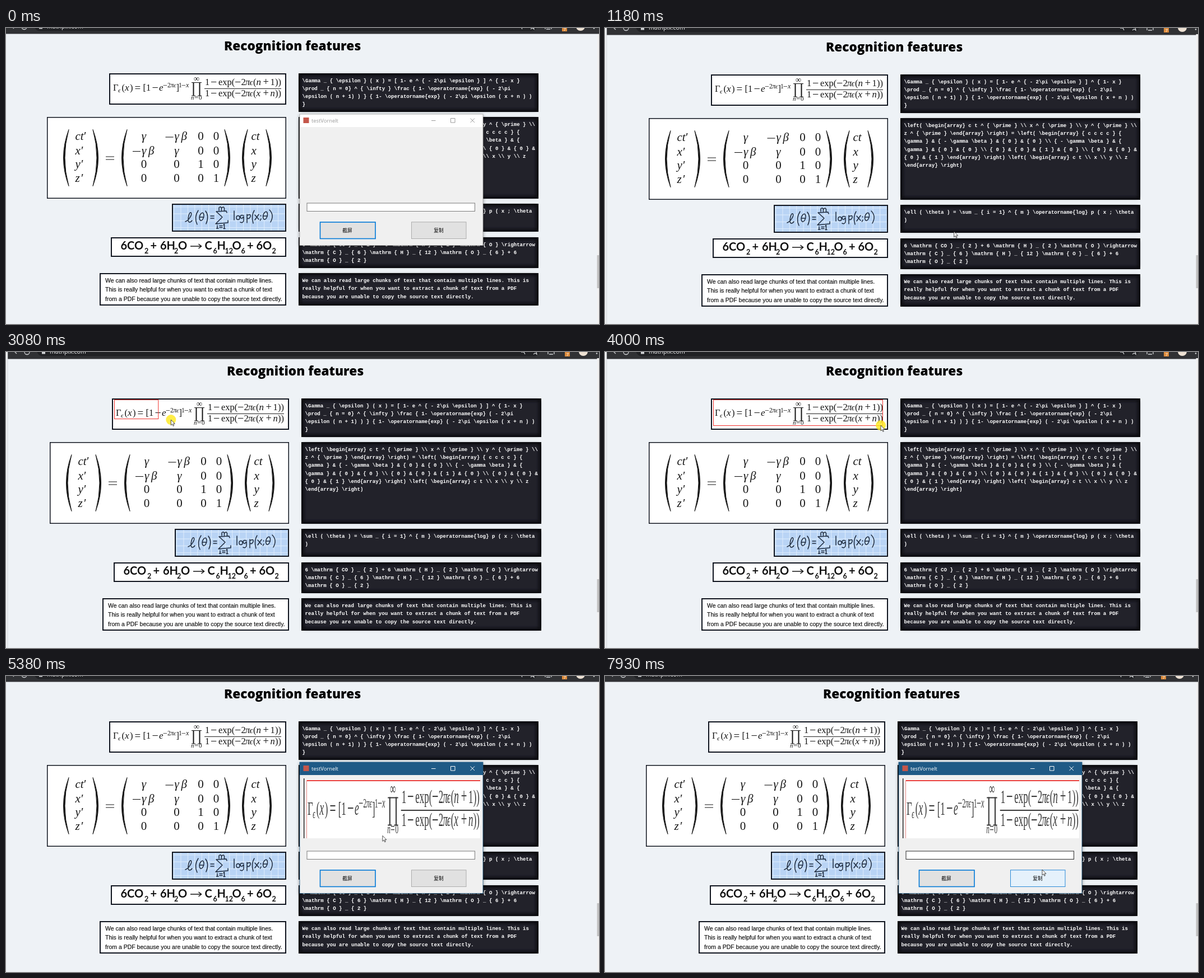
An HTML page for the animation above (8000 ms loop, 1058 by 529 pixels).

```html
<!DOCTYPE html>
<html lang="en">
<head>
<meta charset="utf-8">
<title>Recognition features</title>
<style>
html, body { margin: 0; width: 100%; height: 100%; overflow: hidden; background: #eef2f6; }
svg { display: block; width: 100vw; height: 100vh; }
.code { font: bold 9.12px "Liberation Mono", monospace; fill: #fff; }
.sans { font: 10.5px "Liberation Sans", sans-serif; fill: #0c0c0c; stroke: #0c0c0c; stroke-width: .15px; }
.head { font: 800 22.6px "Open Sans", sans-serif; fill: #000; }
.chem { font: 700 20px Lato, sans-serif; fill: #111; }
.ui { font: 9.4px "Open Sans", sans-serif; }
.cjk { font: 8.7px "Noto Sans CJK SC", "Noto Sans CJK", sans-serif; fill: #000; text-anchor: middle; }
.math { font-family: "Liberation Serif", "DejaVu Serif", serif; fill: #151515; }
.it { font-style: italic; }
.mid { text-anchor: middle; }
.line { fill: none; stroke: #151515; }
</style>
</head>
<body>
<svg id="stage" viewBox="0 0 1058 529" preserveAspectRatio="none">
  <defs>
    <filter id="blur" x="-10%" y="-30%" width="120%" height="160%"><feGaussianBlur stdDeviation="3"/></filter>
    <pattern id="grid" width="12.4" height="12.4" x="299" y="319" patternUnits="userSpaceOnUse">
      <path d="M0 .5H12.4M.5 0V12.4" stroke="#dcebfc" stroke-width="1.2"/>
    </pattern>
    <clipPath id="shotClip"><rect x="531" y="183" width="315" height="107"/></clipPath>
  </defs>
</svg>
<script>
const NS = "http://www.w3.org/2000/svg";
const LOOP = 8000;
const stage = document.getElementById("stage");

function add(parent, tag, attrs = {}, text) {
  const node = document.createElementNS(NS, tag);
  set(node, attrs);
  if (text !== undefined) node.textContent = text;
  parent.appendChild(node);
  return node;
}
function set(node, attrs) {
  for (const k in attrs) node.setAttribute(k, attrs[k]);
}
const rect = (p, x, y, width, height, fill, more = {}) => add(p, "rect", { x, y, width, height, fill, ...more });
const path = (p, d, more = {}) => add(p, "path", { d, class: "line", ...more });
const label = (p, x, y, cls, text, more = {}) => add(p, "text", { x, y, class: cls, ...more }, text);
const show = (node, on) => node.setAttribute("visibility", on ? "visible" : "hidden");

const page = add(stage, "g");
rect(page, -10, -10, 1080, 550, "#eef2f6");

// browser bar
function drawBar() {
  const g = add(page, "g", { stroke: "#d0d2d5", fill: "none", "stroke-width": 1.3 });
  rect(g, -10, -10, 1080, 20.5, "#303134", { stroke: "none" });
  rect(g, 50, -20, 898, 25.5, "#202124", { rx: 11, stroke: "none" });
  add(g, "path", { d: "M14 1L10 -3M28 -2A4.5 4.5 0 0 0 37 -2" });
  rect(g, 59, -4, 6, 5.5, "#d0d2d5", { stroke: "none" });
  label(g, 73, 1, "ui", "mathpix.com", { style: "font-size:10.6px", fill: "#f1f3f4", stroke: "none" });
  add(g, "path", { d: "M914 -2H919L921 2M936 2L939 0L942 2L941 -3" });
  add(g, "path", { d: "M962 2V-2M964 2H971M973 2V-2" });
  rect(g, 992, -4, 9, 10, "#dc8b3c", { stroke: "none" });
  label(g, 994.5, 5, "ui", "7", { style: "font-size:8px", fill: "#fff", stroke: "none" });
  add(g, "circle", { cx: 1025, cy: -3, r: 8, fill: "#eee2d4", stroke: "none" });
  add(g, "circle", { cx: 1049, cy: .5, r: 1.3, fill: "#d0d2d5", stroke: "none" });
}
drawBar();
label(page, 389, 40, "head", "Recognition features");

// dark panels with LaTeX
const panels = [
  [81, 69, 96.5, String.raw`\Gamma _ { \epsilon } ( x ) = [ 1- e ^ { - 2\pi \epsilon } ] ^ { 1- x }
\prod _ { n = 0} ^ { \infty } \frac { 1- \operatorname{exp} ( - 2\pi
\epsilon ( n + 1) ) } { 1- \operatorname{exp} ( - 2\pi \epsilon ( x + n ) )
}`],
  [159, 146, 174.8, String.raw`\left( \begin{array} c t ^ { \prime } \\ x ^ { \prime } \\ y ^ { \prime } \\
z ^ { \prime } \end{array} \right) = \left( \begin{array} { c c c c } {
\gamma } & { - \gamma \beta } & { 0 } & { 0 } \\ { - \gamma \beta } & {
\gamma } & { 0 } & { 0 } \\ { 0 } & { 0 } & { 1 } & { 0 } \\ { 0 } & { 0 } &
{ 0 } & { 1 } \end{array} \right) \left( \begin{array} c t \\ x \\ y \\ z
\end{array} \right)`],
  [314, 50, 330, String.raw`\ell ( \theta ) = \sum _ { i = 1} ^ { m } \operatorname{log} p ( x ; \theta
)`],
  [374, 55, 389.5, String.raw`6 \mathrm { CO } _ { 2 } + 6 \mathrm { H } _ { 2 } \mathrm { O } \rightarrow
\mathrm { C } _ { 6 } \mathrm { H } _ { 12 } \mathrm { O } _ { 6 } + 6
\mathrm { O } _ { 2 }`],
  [438, 58, 454, `We can also read large chunks of text that contain multiple lines. This is
really helpful for when you want to extract a chunk of text from a PDF
because you are unable to copy the source text directly.`]
];
for (const [y, h, base, text] of panels) {
  rect(page, 522, y, 428, h, "#08080c");
  rect(page, 526, y + 4, 420, h - 8, "#20202b", { filter: "url(#blur)" });
  rect(page, 522.5, y + .5, 427, h - 1, "none", { stroke: "#08080c" });
  text.split("\n").forEach((s, i) => label(page, 528.5, base + i * 14.3, "code", s));
}

// framed images
const frames = [[184, 81, 56, 2], [73, 159, 146, 1.5], [296, 314, 50, 2], [187, 374, 35, 2], [167, 438, 58, 2]];
for (const [x, y, h, w] of frames)
  rect(page, x + w / 2, y + w / 2, 500 - x - w, h - w, y === 314 ? "#b9d4f5" : "#fff", { stroke: "#10151f", "stroke-width": w });

const math = (p, x, y, size, text, cls = "") =>
  label(p, x, y, "math " + cls, text, { "font-size": size });

function drawGamma() {
  const g = add(page, "g", { id: "gamma" });
  const put = (x, y, size, text, cls) => math(g, x, y, size, text, cls);
  put(191, 112, 16.5, "Γ");
  put(200, 115, 11, "ϵ", "it");
  put(206.5, 112, 16.5, "(");
  put(212, 112, 17, "x", "it");
  put(221, 112, 16.5, ")");
  put(229.5, 113, 19, "=");
  put(244.5, 112, 16.5, "[1");
  put(260.5, 113, 20, "−");
  put(273, 112, 17, "e", "it");
  put(280, 107, 14, "−");
  put(288, 106, 11.5, "2");
  put(293.5, 106, 11.5, "π", "it");
  put(299, 106, 11, "ϵ", "it");
  put(303.5, 112, 16.5, "]");
  put(308, 106, 11.5, "1");
  put(313, 107, 14, "−");
  put(321, 106, 12, "x", "it");
  put(340, 94.5, 14, "∞", "mid");
  put(330, 128, 11, "n", "it");
  put(336, 128, 13, "=");
  put(344, 128, 11, "0");
  path(g, "M331 97.5H349M331 121H338M342 121H349", { "stroke-width": 1 });
  path(g, "M334.5 97V121M345.5 97V121", { "stroke-width": 2 });
  path(g, "M354 108.3H491", { "stroke-width": 1 });
  for (const [y, a, b] of [[102, "n", "1"], [122, "x", "n"]]) {
    put(355, y, 16.5, "1");
    put(365, y + 1, 20, "−");
    put(379, y, 16.5, "exp(");
    put(408, y + 1, 20, "−");
    put(419.5, y, 16.5, "2");
    put(427, y, 16.5, "π", "it");
    put(434.5, y, 15, "ϵ", "it");
    put(441, y, 16.5, "(");
    put(446.5, y, 17, a, "it");
    put(458.5, y, 18.5, "+");
    put(471.5, y, 16.5, b, b === "n" ? "it" : "");
    put(480, y, 16.5, "))");
  }
}
drawGamma();

function drawMatrix() {
  const rows = [200, 225.5, 250, 275];
  const size = 21;
  const cell = (x, y, s) => {
    if (s === "−γβ") {
      path(page, `M${x - 20} ${y - 5}h14`, { "stroke-width": 1.1 });
      math(page, x - 4, y, size, "γ", "it");
      math(page, x + 8, y, size, "β", "it");
    } else math(page, x, y, size, s, s === "γ" ? "it mid" : "mid");
  };
  const grid = ["γ −γβ 0 0", "−γβ γ 0 0", "0 0 1 0", "0 0 0 1"];
  const cols = [246, 304.5, 347.5, 375];
  rows.forEach((y, i) => {
    const name = ["ct", "x", "y", "z"][i];
    math(page, 123.5, y, size, name, "it");
    math(page, i ? 134 : 139, y, size, "′");
    math(page, 437.5, y, size, name, "it");
    grid[i].split(" ").forEach((s, j) => cell(cols[j], y, s));
  });
  for (const x of [112, 216, 431])
    path(page, `M${x} 181.5Q${x - 19} 232 ${x} 282.5Q${x - 14} 232 ${x} 181.5Z`, { style: "fill:#151515" });
  for (const x of [155, 390, 464])
    path(page, `M${x} 181.5Q${x + 19} 232 ${x} 282.5Q${x + 14} 232 ${x} 181.5Z`, { style: "fill:#151515" });
  path(page, "M178 230H193M178 235H193", { "stroke-width": 1.1 });
}
drawMatrix();

function drawNote() {
  rect(page, 298, 316, 200, 46, "url(#grid)");
  const ink = { style: "stroke:#1d2a3d;stroke-width:1.5;stroke-linecap:round;stroke-linejoin:round" };
  const theta = "M346 343C343 336 349 328 352 331C355 336 350 348 346 343ZM346 338H353";
  path(page, "M320 346C326 344 333 333 330 330C326 328 323 346 327 347Q330 347 332 344M343 326Q335 338 341 351M356 327Q363 336 357 350M365 336H371M365 340H371", ink);
  path(page, theta, ink);
  path(page, theta, { ...ink, transform: "translate(113.5 -2)" });
  path(page, "M394 330L393 327L375 328L386 338L374 350L396 348V344M380 326V321Q383 318 384.5 322V326M384.5 322Q388 318 389.5 322V326", ink);
  path(page, "M377 353V358M375.5 358H379M377 350V350.3M381 353.5H386M381 356.5H386M388 352L389.5 350.5V358.5M388 358.5H391", ink);
  path(page, "M407 327V343M411 339a3 3.5 0 1 0 6 0a3 3.5 0 1 0 -6 0M424 335Q418 333 418 338Q420 343 424 337V345Q422 349 418 347", ink);
  path(page, "M430 333V348M430 335Q437 331 436 337Q434 342 430 340M443 326Q437 335 441 349M444 334L451 342M451 333L444 343M454.5 335V336M455 341L453.5 344M470 325Q479 334 472 347", ink);
}
drawNote();

function drawReaction() {
  const big = [[204.5, "6CO"], [257.5, "+"], [275, "6H"], [307, "O"], [354.5, "C"], [376.5, "H"], [403.5, "O"], [430, "+"], [446.5, "6O"]];
  const sub = [[247, "2"], [300, "2"], [369.5, "6"], [390.5, "12"], [419.5, "6"], [474.5, "2"]];
  for (const [x, s] of big) label(page, x, 396, "chem", s);
  for (const [x, s] of sub) label(page, x, 403, "chem", s, { style: "font-size:12.5px" });
  path(page, "M329 390H348M343.5 386L348.5 390L343.5 394", { "stroke-width": 1.6 });
}
drawReaction();

["We can also read large chunks of text that contain multiple lines.",
 "This is really helpful for when you want to extract a chunk of text",
 "from a PDF because you are unable to copy the source text directly."
].forEach((s, i) => label(page, 177, 455 + i * 16.4, "sans", s));

// edge of the capture overlay and the scrollbar
const edge = add(stage, "g");
rect(edge, 0, 0, 3, 529, "#f3f5f7");
rect(edge, 2.5, 0, .8, 529, "#c5cad0");
rect(stage, 1054.5, 11, 4, 518, "#f1f1f1");
rect(stage, 1054.5, 406, 4, 59, "#c1c1c1");

// app window
const win = add(stage, "g");
rect(win, 524, 156, 327, 233, "#000", { opacity: .45, filter: "url(#blur)" });
rect(win, 524, 154, 327, 234.5, "#f0f0f0");
const titleBar = rect(win, 524, 154, 327, 23, "#fff");
rect(win, 530.5, 160, 10, 10, "#c4564a");
const title = label(win, 545, 169, "ui", "testVornelt");
const controls = add(win, "path", { d: "M759 165.5H766.5M793.5 161.5H801V169H793.5ZM828.5 161.5L836 169M836 161.5L828.5 169", fill: "none" });
const outline = rect(win, 524, 154, 327, 234.5, "none");
const field = rect(win, 537, 313, 299.5, 14.5, "#fff");
const snap = rect(win, 560.5, 347, 98.5, 29.5, "#e1e1e1");
const copy = rect(win, 723.5, 346.8, 97.5, 29.7, "#e1e1e1");
label(win, 609, 365, "cjk", "截屏");
label(win, 772, 365, "cjk", "复制");

const shot = add(win, "g", { "clip-path": "url(#shotClip)" });
rect(shot, 531, 185, 315, 105, "#fff");
add(shot, "use", { href: "#gamma", opacity: .85, transform: "translate(538 240) scale(1.023 2.08) translate(-191 -108.3)" });
rect(shot, 531, 183, 1.4, 107, "#151515");
rect(shot, 536, 186, 310, 2, "#e8403c");
rect(shot, 536, 186, 1, 104, "#e58a86");

// selection and pointer
const marquee = add(stage, "rect", { fill: "none", stroke: "#f0302c", "stroke-width": 1 });
const halo = add(stage, "circle", { r: 9, fill: "#ffe81a", opacity: .8 });
const pointer = add(stage, "path", {
  d: "M0 0V10L2.3 7.8L3.9 11.4L5.4 10.7L3.9 7.3H7Z", fill: "#fff", stroke: "#222", "stroke-width": .8
});

// pointer track: time, x, y
const track = [
  [270, 954, 514], [520, 850, 450], [760, 690, 390], [900, 625, 366], [1000, 623, 364],
  [1180, 623, 364], [1260, 600, 345], [1500, 430, 220], [1800, 230, 110], [1980, 195, 90],
  [2310, 193, 85], [2530, 193, 85], [2700, 203, 92], [2995, 271, 119], [3080, 294, 121],
  [3310, 372, 130], [3390, 378, 130], [3915, 495, 131], [4000, 492, 131], [4160, 495, 133],
  [4560, 501, 133], [4950, 501, 133], [5200, 600, 230], [5540, 735, 334], [5710, 738, 336],
  [6150, 786, 375], [6460, 781, 367], [6690, 781, 367], [6930, 779.5, 364], [7240, 779.5, 364],
  [7610, 780, 314], [7770, 780, 314], [7930, 780, 346], [8000, 780, 346]
];
function pointerAt(t) {
  let i = 1;
  while (i < track.length - 1 && track[i][0] < t) i++;
  const [t0, x0, y0] = track[i - 1], [t1, x1, y1] = track[i];
  const k = Math.min(1, Math.max(0, (t - t0) / (t1 - t0)));
  return [x0 + (x1 - x0) * k, y0 + (y1 - y0) * k];
}

const SHOT = [1180, 4780], DRAG = [2530, 4560], CLICK = [940, 1050];
const HIDE = 1050, REOPEN = 5040, LAG = 85;
const within = (t, [a, b]) => t >= a && t < b;

function render(t) {
  const [x, y] = pointerAt(t);
  const capturing = within(t, SHOT);
  const seen = t >= 270;
  page.setAttribute("transform", capturing ? "translate(5 2)" : "");
  show(edge, capturing);

  const open = t < HIDE || t >= REOPEN;
  const active = t >= CLICK[0];
  win.setAttribute("display", open ? "inline" : "none");
  shot.setAttribute("display", t >= REOPEN ? "inline" : "none");
  set(titleBar, { fill: active ? "#1f5a86" : "#fff" });
  set(title, { fill: active ? "#fff" : "#999" });
  set(controls, { stroke: active ? "#fff" : "#999" });
  set(outline, { stroke: active ? "#1f5a86" : "#a8a8a8", "stroke-width": .8 });

  const inRow = seen && y >= 345.9 && y <= 377;
  const onSnap = inRow && x >= 560 && x <= 660;
  const onCopy = inRow && x >= 723 && x <= 821;
  const pressed = within(t, CLICK);
  set(snap, {
    fill: pressed ? "#cce4f7" : onSnap ? "#e5f1fb" : "#e1e1e1",
    stroke: pressed ? "#005499" : "#0078d7",
    "stroke-width": 1.6
  });
  set(copy, { fill: onCopy ? "#e5f1fb" : "#e1e1e1", stroke: onCopy ? "#2a8ad8" : "#adadad", "stroke-width": 1 });
  set(field, { stroke: t > 7450 ? "#2b2b2b" : "#7a7a7a", "stroke-width": 1 });

  const [mx, my] = pointerAt(Math.max(DRAG[0], t - LAG));
  show(marquee, within(t, [DRAG[0] + LAG, SHOT[1]]));
  set(marquee, { x: 193.5, y: 85.5, width: Math.max(0, mx - 193), height: Math.max(0, my - 85) });
  show(halo, pressed || within(t, DRAG));
  set(halo, { cx: x, cy: y });
  show(pointer, seen);
  set(pointer, { transform: `translate(${x} ${y})` });
}

const start = performance.now();
function tick() {
  render((performance.now() - start) % LOOP);
  requestAnimationFrame(tick);
}
tick();
</script>
</body>
</html>
```
